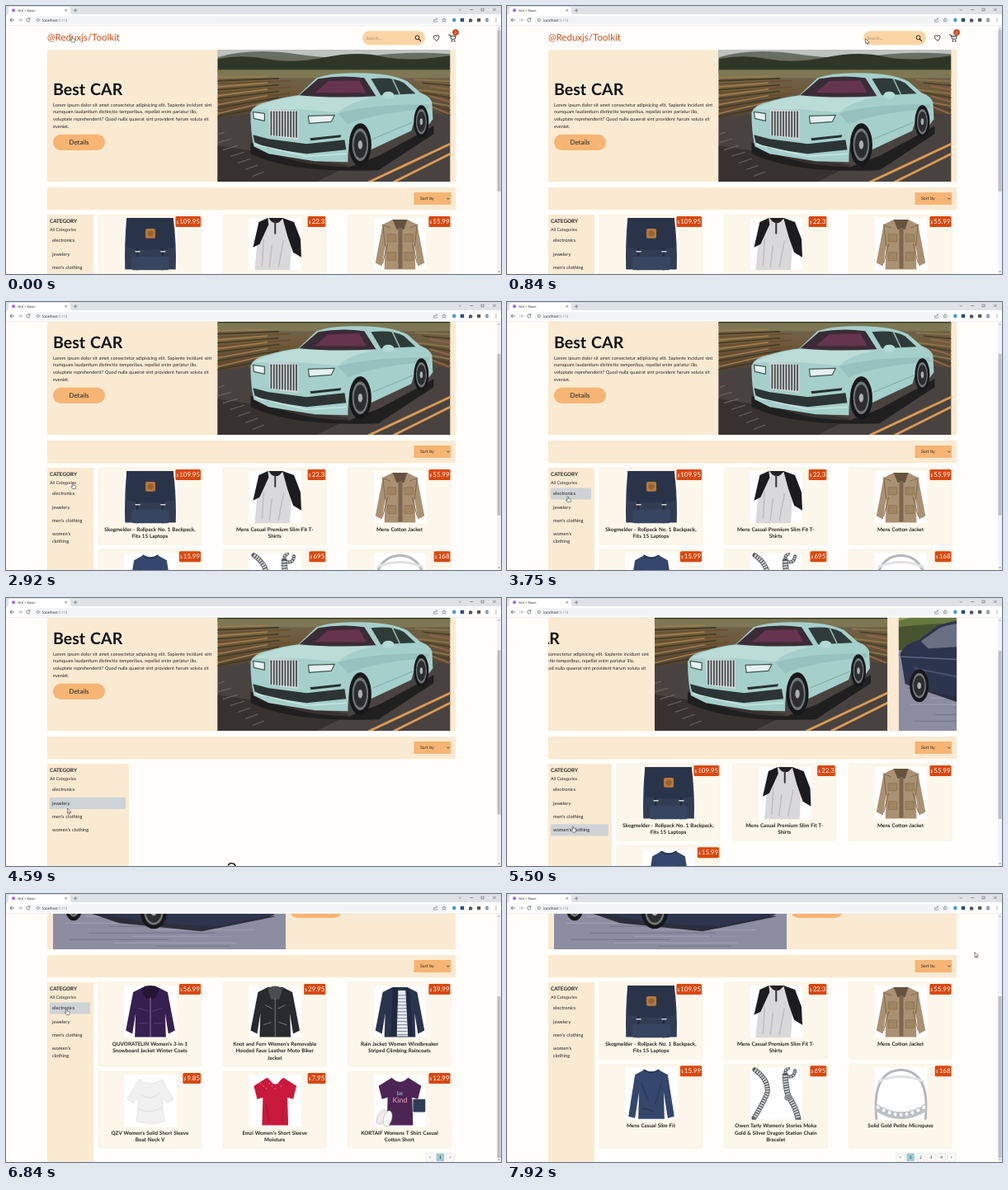
Recreate the animation shown at these times as an HTML page. Size 600 by 325 pixels, loop 8000 ms.

```html
<!DOCTYPE html>
<html lang="en">
<head>
<meta charset="utf-8">
<title>Shop</title>
<style>
html, body { margin: 0; width: 100%; height: 100%; overflow: hidden; background: #fffefa; }
svg { display: block; width: 600px; height: 325px; }
text { font-family: Lato, "Open Sans", sans-serif; fill: #222; word-spacing: .06em; text-rendering: geometricPrecision; white-space: pre; }
.b { font-weight: 700; }
.ui { font-family: "Open Sans", sans-serif; }
</style>
</head>
<body>
<svg id="stage" viewBox="0 0 600 325"></svg>
<script>
const LOOP = 8000;
const $ = id => document.getElementById(id);
const rect = (x, y, w, h, fill, rx = 0, extra = '') =>
  `<rect x="${x}" y="${y}" width="${w}" height="${h}" fill="${fill}" rx="${rx}" ${extra}/>`;
const path = (d, fill, stroke = 'none', w = 1) =>
  `<path d="${d}" fill="${fill}" stroke="${stroke}" stroke-width="${w}" stroke-linecap="round" stroke-linejoin="round"/>`;
const line = (d, stroke, w) => path(d, 'none', stroke, w);
const oval = (x, y, rx, ry, fill, extra = '') =>
  `<ellipse cx="${x}" cy="${y}" rx="${rx}" ry="${ry}" fill="${fill}" ${extra}/>`;
const text = (x, y, size, str, extra = '') =>
  `<text x="${x}" y="${y}" font-size="${size}" ${extra}>${str}</text>`;
const group = (x, y, body) => `<g transform="translate(${x} ${y})">${body}</g>`;
const repeat = (n, f) => Array.from({ length: n }, (_, i) => f(i)).join('');

// Garment outlines inside a 64 x 64 picture
const longSleeve = 'M23,3Q32,7 41,3L52,9L60,60L52,62L47,30L48,63H16L17,30L12,62L4,60L12,9Z';
const coat = 'M23,2H41L53,8L62,55L54,59L50,34L51,63H13L14,34L10,59L2,55L11,8Z';
const tee = 'M22,4Q32,14 42,4L58,14L54,30L47,28L48,62H16L17,28L10,30L6,14Z';
const links = (d, w) => line(d, '#55585b', w) +
  `<path d="${d}" fill="none" stroke="#d5d7d9" stroke-width="${w - 1.5}" stroke-dasharray="1.8 1.3"/>`;

const art = {
  bag: path('M3,0H60Q64,30 63,63H1Q0,30 3,0Z', '#323d54') + path('M3,0H60L61,36Q32,42 3,36Z', '#2a3448') +
    rect(26, 13, 12, 12, '#b5793f', 2) + oval(32, 19, 3.5, 3.5, '#99602f') +
    line('M16,38V63M47,38V63', '#232b3b', 2.5) + line('M14,41H19M45,41H50', '#d8d6cf', 1.5) +
    rect(9, 47, 46, 17, '#384560', 3),
  raglan: path('M22,0H43L52,28L50,64H7L10,30Z', '#d9d9db') +
    path('M23,0L12,5L5,36L13,32L24,8Z M41,0L55,5L63,26L64,48L54,42L47,22Z', '#1c1b1e') +
    path('M24,0H42L37,5Q32,8 27,4Z', '#222') + line('M32,5V19', '#333', 2) +
    line('M18,26L16,58M42,28L36,60M28,34L25,60', '#bdbdc1', 1.5),
  coat: path(coat, '#aa9172') + path('M23,2H41L37,14H28Z', '#66533f') + path('M30,12H35V62H30Z', '#7c674e') +
    line('M17,32L11,55M47,32L53,55M11,8L14,34M53,8L50,34', '#7d664c', 1) +
    path('M17,20H27V29H17ZM38,20H48V29H38ZM17,42H27V52H17ZM38,42H48V52H38Z', '#a08561', '#80694e', .6) +
    line('M12,9L20,12M52,9L44,12', '#80694e', 1),
  slim: path(longSleeve, '#34466b') + line('M23,3Q32,10 41,3', '#22304f', 1.5) + line('M20,20L28,40M44,20L37,44M22,50L34,54', '#2a3958', 1.5),
  chain: links('M47,1Q40,5 46,11Q54,13 55,4', 4) + links('M6,3Q24,16 21,32Q14,48 5,62', 6) +
    links('M43,10Q44,26 47,36Q56,48 59,63', 7) + oval(47, 37, 5, 4, '#8b8e91'),
  ring: path('M2,63Q-4,5 32,3Q68,5 62,63', 'none', '#b4b7ba', 3) + path('M5,17Q32,6 59,17', 'none', '#dfe1e3', 3) +
    path('M0,44Q32,65 64,44V53Q32,74 0,53Z', '#c0c3c6') +
    repeat(9, i => oval(4 + i * 7, 49 + 9 * Math.sin(i * Math.PI / 8), 2.7, 3, '#f4f5f6', 'stroke="#8f9397" stroke-width=".6"')),
  parka: path(coat, '#35204f') + path('M22,8Q20,0 32,0Q44,0 42,8L37,16H27Z', '#251537') + line('M32,15V62', '#9470b3', 1) +
    line('M18,28L29,31M46,28L35,31M18,46H28M36,46H46', '#53366e', 1.2),
  leather: path(coat, '#292a2d') + path('M23,4Q32,-3 41,4L37,17H27Z', '#4b4c50') + line('M32,16V62M20,24L28,28M44,24L36,28M18,48L27,45M46,48L37,45', '#77797d', 1),
  rain: path(coat, '#2a344c') + path('M28,6H39L42,62H28Z', '#e7e9ee') +
    repeat(13, i => line(`M29,${12 + i * 4}H41`, '#6c7893', .9)) + path('M23,3L30,2L28,62H21ZM39,2L44,5L48,62H42Z', '#202940'),
  white: path('M18,6Q32,16 46,6L60,30L53,35L46,28L49,57Q32,63 15,57L18,28L11,35L4,30Z', '#f0f0f0', '#d8d8d8', .6) +
    line('M20,24Q32,34 44,22M18,42Q32,50 46,40', '#dcdcdc', 1),
  red: path(tee, '#c9193c') + path('M24,4Q32,20 40,4Z', '#fff') + line('M21,36L25,58M43,34L40,58', '#a71432', 1) +
    repeat(8, i => oval(14 + i * 3.6, 11 + i % 3 * 3, .6, .6, '#f3b9c0')),
  knot: path(tee, '#4c2555') + rect(48, 30, 15, 16, '#2f3c55', 1) + oval(10, 52, 5, 10, '#eceaea', 'transform="rotate(30 10 52)" stroke="#aaa" stroke-width=".5"') +
    oval(17, 54, 5, 10, '#f7f6f6', 'transform="rotate(15 17 54)" stroke="#aaa" stroke-width=".5"') +
    text(32, 25, 7, 'be', 'text-anchor="middle" style="fill:#9fd0d2"') + text(32, 34, 9, 'Kind', 'text-anchor="middle" style="fill:#e5a7b8"')
};

const mens = [
  ['bag', '109.95', 'Skogmelder - Rollpack No. 1 Backpack,|Fits 15 Laptops'],
  ['raglan', '22.3', 'Mens Casual Premium Slim Fit T-|Shirts'],
  ['coat', '55.99', 'Mens Cotton Jacket'],
  ['slim', '15.99', 'Mens Casual Slim Fit']
];
// tall: scrollable page height, side: sidebar width
const views = {
  all: { side: 56, pages: 4, tall: 447, items: [...mens,
    ['chain', '695', "Owen Tarly Women's Stories Moka|Gold &amp; Silver Dragon Station Chain|Bracelet"],
    ['ring', '168', 'Solid Gold Petite Micropave']] },
  load: { side: 99, pages: 0, tall: 440, items: [] },
  men: { side: 77, pages: 1, tall: 430, items: mens },
  women: { side: 56, pages: 1, tall: 447, items: [
    ['parka', '56.99', "QUVORATELIN Women's 3-in-1|Snowboard Jacket Winter Coats"],
    ['leather', '29.95', "Knot and Fern Women's Removable|Hooded Faux Leather Moto Biker|Jacket"],
    ['rain', '39.99', 'Rain Jacket Women Windbreaker|Striped Climbing Raincoats'],
    ['white', '9.85', "QZV Women's Solid Short Sleeve|Boat Neck V"],
    ['red', '7.95', "Emzi Women's Short Sleeve|Moisture"],
    ['knot', '12.99', 'KORTAIF Womens T Shirt Casual|Cotton Short']] }
};

function card([pic, price, title], x, y, h) {
  const w = 6.3 + price.replace('.', '').length * 4.5 + (price.includes('.') ? 1.8 : 0);
  return group(x, y, rect(0, 0, 125, h, '#fcf7ea', 1.5, 'stroke="#f3ecda" stroke-width=".5"') +
    `<svg x="31" y="4" width="64" height="63.5" viewBox="0 0 64 64">${rect(0, 0, 64, 64, '#fff')}${art[pic]}</svg>` +
    rect(124 - w, 2, w, 13, '#d9480f', 1.5) +
    text(125.1 - w, 11.2, 4.8, '$', 'style="fill:#fff"') +
    text(123, 11.2, 7.9, price, 'text-anchor="end" style="fill:#fff"') +
    title.split('|').map((s, i) => text(62.5, 76.7 + i * 8.7, 6.3, s, 'class="b" text-anchor="middle"')).join(''));
}

function shop(name, hover) {
  const { side, pages, items } = views[name];
  let out = rect(50, 253, side, 230, '#faead2') + text(53, 263.2, 6.3, 'CATEGORY', 'class="b"') + text(53, 272.8, 5.2, 'All Categories');
  ['electronics', 'jewelery', "men's clothing", "women's clothing"].forEach((label, i) => {
    const y = 284.4 + i * 16.3, parts = i === 3 && side < 60 ? label.split(' ') : [label];
    if (i === hover) out += rect(53, y - 7, side - 7, 5.2 + 9 * parts.length, '#ced3d6', 1.5);
    parts.forEach((s, k) => out += text(56, y + 2 + k * 9, 5.75, s));
  });
  const left = 56 + side, step = (414.5 - left) / 2;
  let y = 253;
  for (let i = 0; i < items.length; i += 3) {
    const row = items.slice(i, i + 3);
    const h = 75.8 + 8.7 * Math.max(...row.map(r => r[2].split('|').length));
    row.forEach((item, k) => out += card(item, left + k * step, y, h));
    y += h + 6;
  }
  if (pages) {
    const marks = ['&lt;', ...Array.from({ length: pages }, (_, i) => i + 1), '&gt;'];
    marks.forEach((m, i) => {
      const x = 534 - (marks.length - 1 - i) * 12.4;
      out += rect(x, y + .5, 9.5, 9.5, m === 1 ? '#9bcbd8' : '#fff', .5, 'stroke="#d5d5d2" stroke-width=".6"') +
        text(x + 4.75, y + 7.1, 5, m, 'text-anchor="middle"');
    });
  }
  return out;
}

const wheel = (x, y, rx, ry) => oval(x, y, rx, ry, '#17181a') + oval(x, y, rx * .72, ry * .76, '#717778') +
  oval(x, y, rx * .58, ry * .62, '#2b2d2f') + oval(x, y, rx * .2, ry * .2, '#a9afaf');

const mintCar = rect(0, 0, 282, 160, 'url(#field)') + path('M0,0H282V5Q230,1 190,7T95,5T0,9Z', '#bfc3bf') +
  path('M0,11Q30,5 60,11T130,9T200,8T282,7V28H0Z', '#2e3628') + rect(0, 24, 282, 10, '#7d7853') +
  repeat(14, i => line(`M0,${34 + i * 3.6}L${60 + i % 3 * 14},${32 + i * 2.6}`, ['#a27c4c', '#45391f', '#6b4c2c'][i % 3], 1.6)) +
  repeat(9, i => line(`M${240 + i % 3 * 9},${36 + i * 4}L282,${38 + i * 5}`, ['#8c7548', '#4c4126', '#95634a'][i % 3], 1.8)) +
  path('M0,82L80,74L282,78V160H0Z', '#484340') + path('M0,116L160,140L120,160H0Z', '#37322f') +
  repeat(8, i => line(`M${i * 8},${92 + i * 8}L${-20 + i * 9},${97 + i * 8}`, '#6b625b', 1.2)) +
  line('M282,114L184,160M282,126L214,160', '#df9a52', 2.8) + path('M40,112Q90,142 160,142L196,128L262,92V102L195,146Q90,150 40,126Z', '#201f1f') +
  path('M40,76Q44,66 60,63Q80,57 98,55L120,34Q138,27 172,28Q210,28 230,38L246,52Q258,56 260,64L261,84L255,92Q250,68 241,78L235,98L186,121Q184,84 170,90Q158,98 158,136L118,135L62,126L44,117Q40,100 40,76Z', '#a5cfcb') +
  path('M42,72Q66,60 98,56L188,58Q160,63 146,76L100,72Z', '#bbdcd7') + path('M146,77Q180,66 256,66L258,71Q190,76 158,90Z', '#97c1be') +
  path('M99,55L122,35Q150,30 178,34L192,56Q140,59 99,55Z', '#3a2c36') + path('M118,52L134,38L172,37L180,52Z', '#67344f') +
  path('M198,55L186,35Q212,32 226,40L240,53Z', '#2f3b39') + line('M212,35L221,54', '#8fb5b1', 1.6) + oval(207, 55, 7, 4.5, '#b4dad6') +
  line('M188,108L236,88', '#7fa9a5', 1) + path('M62,72L98,74V109L63,104Z', '#d2d8d6') +
  repeat(10, i => line(`M${65 + i * 3.4},75V${103 + i * .3}`, '#414748', 1.7)) +
  path('M43,75L57,77L57,86L44,83ZM110,80L142,79L138,87L111,89Z', '#e6f2f1', '#455', 1.2) +
  path('M43,103L62,108L108,114L154,109L156,121L108,126L60,119L45,112Z', '#2d3434') + line('M47,115L108,129L156,126', '#c8e5e1', 1.5) +
  path('M112,107L150,103L149,106L113,110Z', '#273031') + wheel(173, 115, 13.5, 26) + wheel(247, 87, 9, 20);

const navyCar = rect(0, 0, 282, 160, '#8c8da1') + path('M0,0H282V50H0Z', '#65793f') + path('M0,0H50L30,20L0,26Z', '#93a764') + path('M0,34Q60,24 282,36V62H0Z', '#46552f') +
  repeat(24, i => line(`M${i * 53 % 130},${68 + i * 4}h${80 + i * 29 % 90}`, i % 2 ? '#a6a6b7' : '#70728a', .9)) +
  path('M10,104L80,128L180,138L270,120L190,108Z', '#2c2d3b') +
  path('M2,66Q8,53 24,50L48,32Q90,18 140,26L190,50L262,76Q276,95 268,118L200,132L120,128L40,113L8,103Z', '#2d344d') +
  path('M27,51L50,35Q64,29 88,28L86,57L36,60Z', '#6b6f82') + path('M93,28Q130,24 150,34L182,56L93,58Z', '#566077') +
  line('M4,70L90,74L258,82', '#5d6681', 1.5) + line('M20,84L100,100', '#49516c', 2) + path('M214,90H262V112H212Z', '#aeb4bd') +
  wheel(25, 105, 11.5, 20) + wheel(122, 115, 16, 20);

const lorem = ['Lorem ipsum dolor sit amet consectetur adipisicing elit. Sapiente incidunt sint',
  'numquam laudantium distinctio temporibus, repellat enim pariatur illo,',
  'voluptate reprehenderit? Quod nulla quaerat sint provident harum soluta sit', 'eveniet.'];
const blurb = x => text(x, 107.5, 19.6, 'Best CAR', 'class="b" style="fill:#111"') +
  lorem.map((s, i) => text(x, 121.5 + i * 8.8, 5.62, s)).join('') +
  rect(x, 155.7, 63, 19.3, '#f6b574', 9.6) + text(x + 31.5, 168, 7.9, 'Details', 'text-anchor="middle"');

const header = text(50, 42.3, 11.5, '@Reduxjs/Toolkit', 'style="fill:#c9511c"') +
  rect(432, 30.3, 76, 17, '#fbd5a5', 8.5) + text(436.5, 40.6, 5.2, 'Search...', 'style="fill:#a08b70"') +
  '<circle cx="498.5" cy="38.2" r="2.4" fill="none" stroke="#222" stroke-width="1"/>' + line('M500.4,40.1L502.6,42.3', '#222', 1.2) +
  line('M521.7,42.2L518.8,39.2Q517.5,37 519.3,35.8Q521,35.2 521.7,37Q522.5,35.2 524.2,35.8Q526,37 524.6,39.2Z', '#222', .9) +
  line('M536.5,35H538.2L539.8,40.2H544.2L545.2,36.5H538.7', '#222', .9) + oval(540.5, 42.5, .9, .9, '#222') + oval(543.7, 42.5, .9, .9, '#222') +
  oval(545, 32, 3.8, 3.8, '#c63d0c') + text(545, 33.8, 5, '0', 'text-anchor="middle" style="fill:#fff"');

const chrome = rect(0, 0, 600, 10, '#dee1e6') + path('M1,10Q3,10 3,8V3Q3,1 5,1H76Q78,1 78,3V8Q78,10 80,10Z', '#fff') +
  oval(9, 5.3, 2, 2, '#9b62f0') + text(14, 6.9, 3.9, 'Vite + React', 'class="ui"') + line('M71.7,4.3l2,2m0,-2l-2,2M82.3,5.3h3.6m-1.8,-1.8v3.6', '#555', .6) +
  line('M549,4.2l1.3,1.2 1.3,-1.2M562.7,4.5h3M576.4,3h2.7v2.8h-2.7zM590.5,3l2.8,2.8m0,-2.8l-2.8,2.8', '#444', .5) +
  rect(0, 10, 600, 14, '#fff') + rect(33, 12.3, 503, 9.4, '#f1f3f4', 4.7) + rect(0, 23.5, 600, .5, '#dadce0') +
  line('M9.5,17H5.2m1.8,-1.9L5.1,17l1.9,1.9', '#555', .8) + line('M15,17h4.3m-1.8,-1.9l1.9,1.9l-1.9,1.9', '#aaa', .8) +
  line('M28.7,15.6A2.2,2.2 0 1 0 29,17.7M28.9,14.7v1.4h-1.4', '#555', .7) +
  '<circle cx="38.8" cy="17" r="1.7" fill="none" stroke="#666" stroke-width=".5"/>' + line('M38.8,16.8v.9', '#666', .5) +
  text(44, 18.6, 4.5, 'localhost<tspan fill="#80868b">:5173</tspan>', 'class="ui"') +
  line('M519.5,16.5h-1v2.7h4v-1.4M520,17.5q.4,-2 2.5,-2m-1,-1l1.1,1l-1.1,1', '#666', .5) +
  line('M531,14.7l.7,1.6 1.7,.1-1.3,1.1.4,1.7-1.5,-.9-1.5,.9.4,-1.7-1.3,-1.1 1.7,-.1z', '#666', .5) +
  oval(543.3, 17, 2.2, 2.2, '#3f96c8') + rect(550.8, 14.8, 4.4, 4.4, '#254f78', .6) +
  path('M561,15.7h1.1q.7,-2 1.5,0h1.4v1.2q1.8,.8 0,1.5v1.2h-4z', '#555') + rect(571, 14.9, 4.2, 4.2, '#555', .5) +
  oval(583, 17, 2.8, 2.8, '#c9d1d8') + oval(583, 16, .9, .9, '#55606b') + path('M581.2,18.8q1.8,-2.5 3.6,0z', '#55606b') +
  repeat(3, i => oval(594, 15.3 + i * 1.7, .5, .5, '#555'));

$('stage').innerHTML = `<defs>
  <clipPath id="frame"><rect x="50" y="53.3" width="495" height="160"/></clipPath>
  <clipPath id="photo"><rect width="282" height="160"/></clipPath>
  <linearGradient id="field" x2="0" y2="1"><stop stop-color="#69716a"/><stop offset=".3" stop-color="#6f5b3b"/><stop offset=".55" stop-color="#4a4036"/></linearGradient></defs>` +
  rect(0, 0, 600, 325, '#fffefa') +
  `<g id="page">${header}<g clip-path="url(#frame)">${rect(50, 53, 495, 161, '#faead2')}<g id="slides">` +
  blurb(57) + group(256.4, 53.3, `<g clip-path="url(#photo)">${mintCar}</g>`) +
  group(495, 0, blurb(344) + group(57, 53.3, `<g clip-path="url(#photo)">${navyCar}</g>`)) + '</g></g>' +
  rect(50, 220, 495, 27.3, '#faead2') + rect(494.5, 226, 44.7, 15, '#f6b574') + text(502, 235.3, 5.2, 'Sort by') +
  line('M534.5,233l1.4,1.4l1.4,-1.4', '#222', .8) + '<g id="shop"></g>' +
  '<g id="spin"><circle r="4.8" fill="none" stroke="#111" stroke-width="1.5" stroke-dasharray="23 7.2" stroke-linecap="round"/></g></g>' +
  rect(595, 24, 5, 301, '#f2f2f2') + path('M596.3,27.6l1.2,-1.4 1.2,1.4zM596.3,321.6l1.2,1.4 1.2,-1.4z', '#777') +
  '<rect id="thumb" x="595.5" width="4" fill="#c1c1c1"/>' + chrome +
  '<g id="cursor">' +
  `<g id="arrow">${path('M0,0V5.8L1.4,4.6L2.3,6.6L3.2,6.2L2.3,4.2H4.1Z', '#fff', '#111', .5)}</g>` +
  `<g id="hand">${path('M-.7,.4Q0,-.6 .7,.4V2.6L3.4,3.2Q4,3.5 3.8,4.6L3.1,7H-.2L-2.3,4.3Q-2,3.3 -.7,4.3Z', '#fff', '#111', .5)}</g></g>`;

// Cursor stops: time, x, y
const stops = [[0, 80, 37], [300, 96, 39], [950, 462, 40], [1170, 480, 40], [1450, 525, 42], [1750, 490.5, 56], [2000, 440, 80], [2450, 200, 190],
  [2920, 81, 219.5], [3500, 74, 231], [4200, 73, 247], [4590, 74.5, 255.5], [5000, 78, 266], [5500, 80, 277],
  [5950, 84, 279], [6350, 86, 240], [6840, 73.5, 139.5], [7100, 71, 126], [7300, 73, 126], [7920, 567, 71], [8000, 567, 71]];
const scenes = [[0, 'all'], [4250, 'load'], [5150, 'men'], [5750, 'load'], [6150, 'women'], [7150, 'all']];
const ease = (t, from, dur) => {
  const u = Math.min(1, Math.max(0, (t - from) / dur));
  return u * u * (3 - 2 * u);
};

let drawn = '';
function render(t) {
  const i = Math.max(1, stops.findIndex(s => s[0] > t)), [t0, x0, y0] = stops[i - 1], [t1, x1, y1] = stops[i];
  const k = ease(t, t0, t1 - t0), x = x0 + (x1 - x0) * k, y = y0 + (y1 - y0) * k;
  const view = scenes.filter(s => s[0] <= t).pop()[1];
  const scroll = 52 * ease(t, 2350, 300) + 94 * ease(t, 6350, 300);
  const py = y + scroll, inSide = x > 53 && x < 46 + views[view].side;
  const row = Math.floor((py - 276.6) / 16.3);
  const hover = inSide && row >= 0 && row < 4 ? row : -1;
  const link = (inSide && view !== 'load' && (hover >= 0 || (py > 267 && py < 275))) || (py < 46 && x < 140);
  if (drawn !== view + hover) {
    drawn = view + hover;
    $('shop').innerHTML = shop(view, hover);
  }
  const move = (id, dx, dy, more = '') => $(id).setAttribute('transform', `translate(${dx} ${dy}) ${more}`);
  move('page', 0, -scroll);
  move('slides', -495 * ease(t, 5376, 500), 0);
  move('spin', 273.5, 378.5, `rotate(${t * .36 % 360})`);
  move('cursor', x, y);
  $('spin').style.display = view === 'load' ? '' : 'none';
  $('arrow').style.display = link ? 'none' : '';
  $('hand').style.display = link ? '' : 'none';
  const ratio = 291 / views[view].tall;
  $('thumb').setAttribute('y', 29 + scroll * ratio);
  $('thumb').setAttribute('height', 301 * ratio);
}

const start = performance.now();
function tick() {
  render((performance.now() - start) % LOOP);
  requestAnimationFrame(tick);
}
tick();
</script>
</body>
</html>
```
